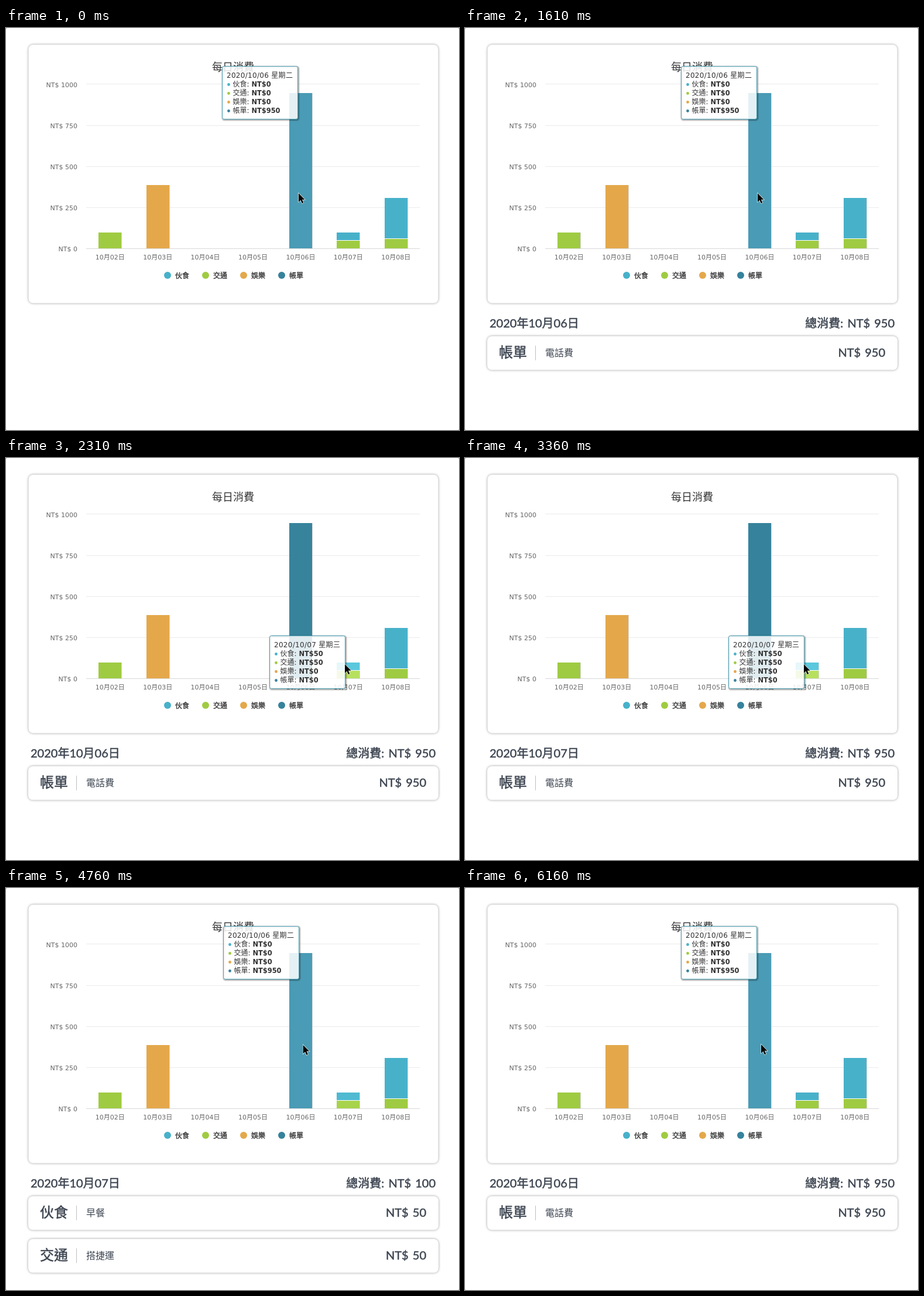
An HTML page for the animation above (6230 ms loop, 774 by 686 pixels).

```html
<!DOCTYPE html>
<html lang="zh-Hant">
<head>
<meta charset="utf-8">
<title>每日消費</title>
<style>
  html, body { margin: 0; width: 100%; height: 100%; overflow: hidden; background: #666; }
  svg { display: block; width: 774px; height: 686px; }
  text { font: 11px "DejaVu Sans", "Noto Sans CJK TC", "Noto Sans CJK", sans-serif; fill: #666; white-space: pre; }
  .card { fill: #fff; filter: drop-shadow(0 0 2px rgba(0, 0, 0, .4)); }
  .title { font-size: 18px; fill: #333; text-anchor: middle; }
  .mid { text-anchor: middle; }
  .end { text-anchor: end; }
  .legend { font-size: 12px; fill: #333; stroke: #333; stroke-width: .35px; }
  .tip { font-size: 12px; fill: #333; }
  .head { letter-spacing: .3px; }
  .value { font-size: 11.4px; font-weight: bold; }
  .big, .kind, .note { font: 20px Lato, "Noto Sans CJK TC", "Noto Sans CJK", sans-serif; fill: #3d4551; }
  .big, .kind { stroke: #3d4551; stroke-width: .5px; word-spacing: 2px; }
  .kind { font-size: 24px; }
  .note { font-size: 16px; }
  .box { fill: rgba(255, 255, 255, .85); stroke: #4fa5ba; }
  .boxShadow { fill: none; stroke: #000; stroke-opacity: .12; }
</style>
</head>
<body>
<svg id="stage" viewBox="0 0 774 686"></svg>
<script>
const LOOP = 6230, STEP = 70;
const LEAVE_BILL = 1860, BACK_TO_BILL = 4470;
const KINDS = [
  { name: "伙食", color: "#48b1ca", bright: "#5bc8dd" },
  { name: "交通", color: "#9fcb42", bright: "#b7e05f" },
  { name: "娛樂", color: "#e4a84b", bright: "#f5c06a" },
  { name: "帳單", color: "#36829c", bright: "#4a9bb5" }
];
// day index, kind, top, bottom
const BARS = [
  [0, 1, 349, 376], [1, 2, 268, 376], [4, 3, 111, 376],
  [5, 0, 349, 362], [5, 1, 363, 376], [6, 0, 290, 359], [6, 1, 360, 376]
];
const DAYS = {
  4: { head: "2020/10/06 星期二", values: [0, 0, 0, 950], x: 369.5, y: 65.5 },
  5: { head: "2020/10/07 星期三", values: [50, 50, 0, 0], x: 450.5, y: 303.5 }
};
// time, x, y
const POINTER = [
  [0, 500, 282], [1610, 500, 282], [1820, 532, 313], [1960, 565, 344], [2100, 579, 352],
  [3850, 579, 352], [4200, 565, 334], [4330, 565, 334], [4470, 544, 310], [4700, 508, 268],
  [5000, 506, 267], [LOOP, 506, 267]
];

const stage = document.getElementById("stage");

function add(parent, tag, attrs, content) {
  const node = document.createElementNS("http://www.w3.org/2000/svg", tag);
  for (const key in attrs) node.setAttribute(key, attrs[key]);
  if (content !== undefined) node.textContent = content;
  return parent.appendChild(node);
}
const label = (parent, x, y, cls, content) => add(parent, "text", { x, y, class: cls }, content);
const card = (parent, x, y, width, height) =>
  add(parent, "rect", { x, y, width, height, rx: 8, class: "card" });
const line = (parent, x1, y1, x2, y2, stroke) => add(parent, "line", { x1, y1, x2, y2, stroke });
const show = (node, on) => node.setAttribute("visibility", on ? "visible" : "hidden");
const place = (node, x, y) => node.setAttribute("transform", `translate(${x} ${y})`);

add(stage, "rect", { width: 774, height: 686, rx: 1.5, fill: "#fff" });
card(stage, 38.5, 28.5, 700, 441);

// Chart
label(stage, 388, 73, "title", "每日消費");
for (let i = 0; i < 5; i++) {
  const y = i ? 96.5 + 70 * i : 95.5;
  line(stage, 137, y, 707, y, i === 4 ? "#d8d8d8" : "#ebebeb");
  label(stage, 122, 101 + 70 * i, "end", "NT$ " + (1000 - 250 * i));
}
for (let i = 0; i < 7; i++) {
  label(stage, 137 + 81.43 * (i + .5), 395, "mid", `10月0${i + 2}日`);
}
const glow = { 4: [], 5: [] };
for (const [day, kind, top, bottom] of BARS) {
  const x = Math.round(137 + 81.43 * (day + .5) - 19.5);
  const shape = { x, y: top, width: 39, height: bottom - top };
  line(stage, x + 39.5, top, x + 39.5, bottom, "#d6d6d6");
  add(stage, "rect", { ...shape, fill: KINDS[kind].color });
  if (glow[day]) glow[day].push(add(stage, "rect", { ...shape, fill: KINDS[kind].bright }));
}
KINDS.forEach(({ name, color }, i) => {
  add(stage, "circle", { cx: 276 + 65 * i, cy: 422, r: 6, fill: color });
  label(stage, 289 + 65 * i, 427, "legend", name);
});

// Daily details
const summary = add(stage, "g");
const dateText = label(summary, 42, 511, "big");
const totalText = label(summary, 734, 511, "big end");

function entryList(entries) {
  const group = add(stage, "g");
  entries.forEach(([kind, note, cost], i) => {
    const row = add(group, "g");
    place(row, 0, 73 * i);
    card(row, 38, 526, 701, 57.5);
    label(row, 58, 562, "kind", kind);
    line(row, 120.5, 542, 120.5, 567, "#bfbfbf");
    label(row, 137, 560, "note", note);
    label(row, 718, 561, "big end", "NT$ " + cost);
  });
  return group;
}
const billList = entryList([["帳單", "電話費", 950]]);
const mealList = entryList([["伙食", "早餐", 50], ["交通", "搭捷運", 50]]);

// Tooltip, laid out from its top left corner
const tooltip = add(stage, "g");
for (const width of [5, 3, 1]) {
  add(tooltip, "rect", {
    x: 1, y: 1, width: 129, height: 90, rx: 3, class: "boxShadow", "stroke-width": width
  });
}
add(tooltip, "rect", { width: 129, height: 90, rx: 3, class: "box" });
const headText = label(tooltip, 7.5, 19.5, "tip head");
const valueTexts = KINDS.map(({ name, color }, i) => {
  const y = 34.5 + 15 * i;
  add(tooltip, "circle", { cx: 11, cy: y - 3.5, r: 2.4, fill: color });
  label(tooltip, 18, y, "tip", name + ":");
  return label(tooltip, 50, y, "tip value");
});

const pointer = add(stage, "path", {
  d: "M0 0V15L3.5 11.8L5.9 17.3L8.3 16.2L5.9 10.8H10.6Z",
  fill: "#000", stroke: "#fff", "stroke-width": 1.2, "paint-order": "stroke"
});

function pointerAt(t) {
  const i = POINTER.findIndex(p => p[0] > t);
  const [t0, x0, y0] = POINTER[i - 1], [t1, x1, y1] = POINTER[i];
  const k = (t - t0) / (t1 - t0);
  return [x0 + (x1 - x0) * k, y0 + (y1 - y0) * k];
}

// Each tick covers a third of the way across and half of the way down
function tooltipAt(from, to, ticks) {
  return [
    Math.round(to.x + (from.x - to.x) * (2 / 3) ** ticks - .5) + .5,
    Math.round(to.y + (from.y - to.y) * .5 ** ticks - .5) + .5
  ];
}

// Hover light fades out over half a second
const fade = ms => (1 + Math.cos(Math.PI * Math.min(ms / 500, 1))) / 2;

function draw(t) {
  const onMeals = t >= LEAVE_BILL && t < BACK_TO_BILL;
  const day = onMeals ? 5 : 4, other = onMeals ? 4 : 5;
  const since = onMeals ? t - LEAVE_BILL : t - BACK_TO_BILL;
  const moved = t >= LEAVE_BILL;

  headText.textContent = DAYS[day].head;
  valueTexts.forEach((node, i) => node.textContent = "NT$" + DAYS[day].values[i]);
  place(tooltip, ...tooltipAt(DAYS[other], DAYS[day], moved ? Math.floor(since / 32) : 99));
  glow[day].forEach(bar => bar.setAttribute("opacity", 1));
  glow[other].forEach(bar => bar.setAttribute("opacity", moved ? fade(since) : 0));
  place(pointer, ...pointerAt(t));

  const mealDate = t >= 3360 && t < 5600;
  const meals = t >= 3430 && t < 5670;
  dateText.textContent = `2020年10月0${mealDate ? 7 : 6}日`;
  totalText.textContent = "總消費: NT$ " + (meals ? 100 : 950);
  show(summary, t >= 700);
  show(billList, t >= 700 && !meals);
  show(mealList, meals);
}

const start = performance.now();
function tick() {
  const t = (performance.now() - start) % LOOP;
  draw(Math.floor(t / STEP) * STEP);
  requestAnimationFrame(tick);
}
tick();
</script>
</body>
</html>
```
